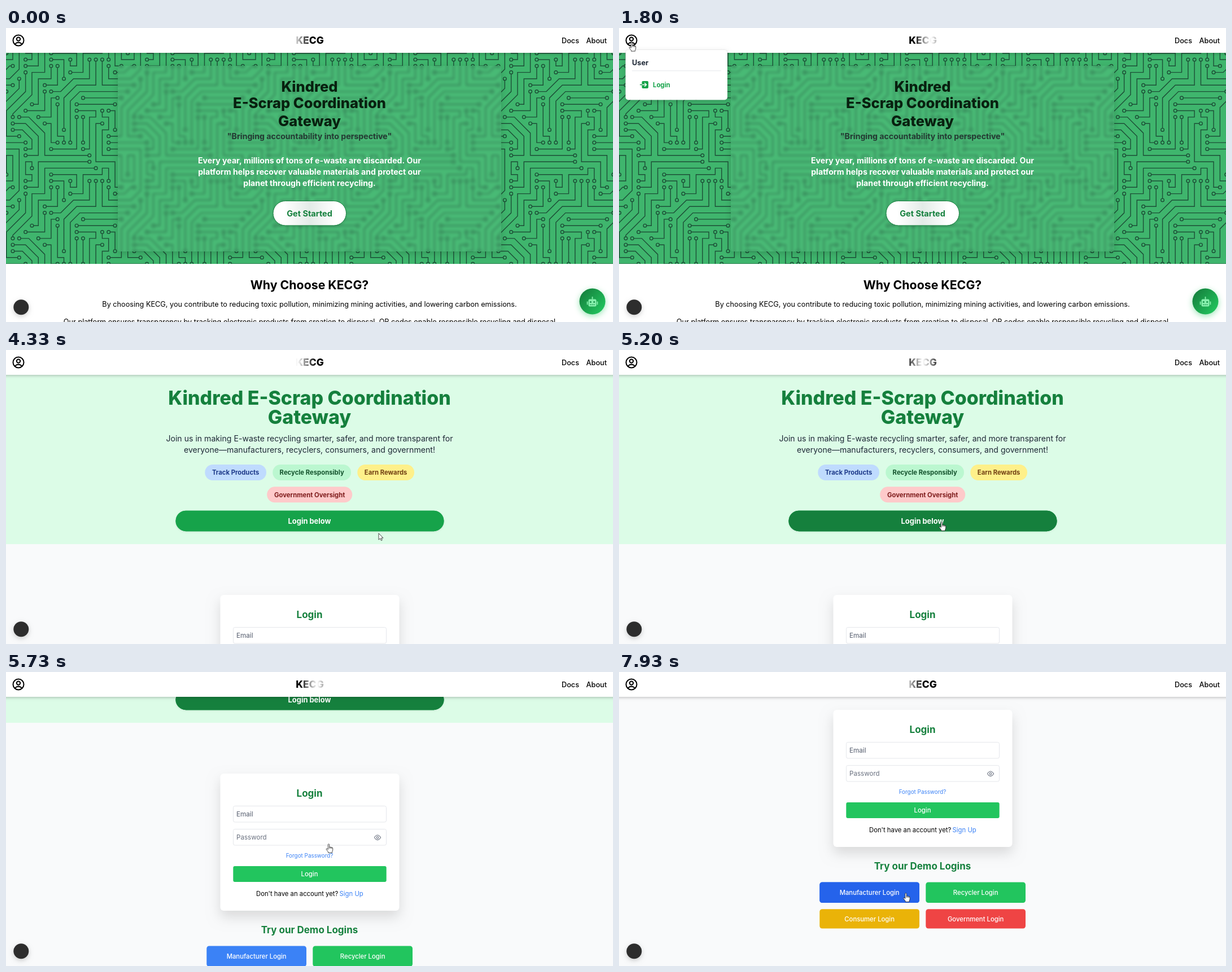
An HTML page with a canvas for the animation above (8000 ms loop, 1075x521 px).

```html
<!DOCTYPE html>
<html lang="en">
<head>
<meta charset="utf-8">
<title>Kindred E-Scrap Coordination Gateway</title>
<style>
html, body { margin: 0; width: 100%; height: 100%; overflow: hidden; background: #fff; }
canvas { display: block; width: 1075px; height: 521px; }
</style>
</head>
<body>
<canvas id="stage"></canvas>
<script>
const W = 1075, H = 521, LOOP = 8000, STEP = 200 / 3;
const POPUP_AT = 1795, LOGIN_AT = 3330, SCROLL_AT = 5265, SCROLL_MS = 762, SCROLL_BY = 367;
const BRAND = 'KECG';
const dpr = window.devicePixelRatio || 1;

function layer(canvas) {
  canvas.width = W * dpr;
  canvas.height = H * dpr;
  const c = canvas.getContext('2d');
  c.scale(dpr, dpr);
  return c;
}
const stage = layer(document.getElementById('stage'));
let g = stage;

// ---- drawing helpers ----
function box(x, y, w, h, r, fill, stroke) {
  g.beginPath();
  g.roundRect(x, y, w, h, r);
  if (fill) { g.fillStyle = fill; g.fill(); }
  if (stroke) { g.strokeStyle = stroke; g.lineWidth = 1; g.stroke(); }
}

function disc(x, y, r, fill) {
  g.beginPath();
  g.arc(x, y, r, 0, 7);
  g.fillStyle = fill;
  g.fill();
}

function shaded(dy, blur, color, draw) {
  g.save();
  g.shadowOffsetY = dy * dpr;
  g.shadowBlur = blur * dpr;
  g.shadowColor = color;
  draw();
  g.restore();
}

// y is the middle of the capitals
function text(str, x, y, size, weight, color, align = 'center') {
  g.font = `${weight} ${size}px Inter, sans-serif`;
  g.textAlign = align;
  g.fillStyle = color;
  g.fillText(str, x, y + size * 0.364);
}

// ---- circuit board background, in units of one grid cell ----
const CELLS = 19, TILE = 215;
const traces = [
  'M3 14H-3', 'M13 17H5V21H3', 'M16 15H21V21.5L19.5 23H16V21', 'M17 8H11', 'M1 5H-4V1',
  'M12 7H18', 'M16 1V-1H15V0H12V3H10', 'M12 14V10', 'M8 8V13H9V14', 'M8 7H7V10H5',
  'M7 15H11V10', 'M6 11H7V14H8', 'M4 18V17H3V19H4V20H3', 'M15 11H14V17H17V21H18',
  'M16 9H17V12', 'M12 15H13V10H14V9H11', 'M6 6V9H3', 'M7 2V4H5V8H4', 'M6 5H8V2', 'M7 1H9V4',
  'M14 18H6V22H4V25.5L1 28.5V29', 'M15 9V10H16V12H15V16H18V20H20V16H19V19',
  'M7 0H11V2H10V1', 'M10 14V7.5L11.5 6H19', 'M1 2H.5L-.5 3H-2'
];
for (let i = 0; i < 3; i++) {
  const [start, down, end] = [[1, 15, 3], [1, 16, 3], [2, 16, 13]][i];
  traces.push(`M${start} ${12 - i}H${2.5 + i / 2}L${4 + i} ${13.5 - i / 2}V${down}H${end}`);
}
for (let i = 0; i < 2; i++) {
  traces.push(`M${3 - i} ${3 + i}V${6 - i / 2}L${-i} ${9 - i / 2}V13H${2 - 5 * i}`);
  traces.push(`M${7 + 2 * i} ${6 + 6 * i}${i ? 'V7' : 'H8.5'}l2 -2H${13 + i}V1`);
}

function traceEnds(d) {
  let x = 0, y = 0, first;
  for (const [, cmd, a, b] of d.matchAll(/([MHVLl])([-\d.]+)(?: ([-\d.]+))?/g)) {
    if (cmd === 'H') x = +a;
    else if (cmd === 'V') y = +a;
    else if (cmd === 'l') { x += +a; y += +b; }
    else { x = +a; y = +b; }
    first = first || [x, y];
  }
  return [first, [x, y]];
}

function circuit() {
  const wires = new Path2D(traces.join(''));
  const ends = traces.flatMap(traceEnds);
  g.fillStyle = '#3fb56d';
  g.fillRect(0, 44, W, 374);
  g.save();
  g.beginPath();
  g.rect(0, 44, W, 374);
  g.clip();
  g.strokeStyle = '#1d4f37';
  for (let row = -2; row < 2; row++) {
    for (let col = -2; col < 6; col++) {
      g.save();
      g.translate(col * TILE + 0.7, 44 + row * TILE + 0.7);
      g.scale(TILE / CELLS, TILE / CELLS);
      g.lineWidth = 0.125;
      g.stroke(wires);
      for (const [x, y] of ends) {
        disc(x, y, 0.25, '#3fb56d');
        g.stroke();
      }
      g.restore();
    }
  }
  g.restore();
}

// ---- home page, drawn once ----
function robotButton() {
  const fill = g.createLinearGradient(1018, 468, 1058, 502);
  fill.addColorStop(0, '#15803d');
  fill.addColorStop(1, '#22c55e');
  shaded(3, 11, 'rgba(34,197,94,.45)', () => disc(1038.5, 484.5, 23, fill));
  const mint = '#86efac';
  box(1031.5, 480.5, 14, 13, 2.5, mint);
  box(1028.7, 484.5, 1.8, 6, 0.8, mint);
  box(1046.5, 484.5, 1.8, 6, 0.8, mint);
  box(1037.6, 476, 1.8, 5, 0.8, mint);
  disc(1035.4, 485.6, 1.5, '#17934a');
  disc(1041.6, 485.6, 1.5, '#17934a');
  for (let i = 0; i < 3; i++) box(1034.3 + i * 3.1, 489.7, 2, 1.3, 0, '#17934a');
}

function homePage() {
  const canvas = document.createElement('canvas');
  g = layer(canvas);
  g.fillStyle = '#fff';
  g.fillRect(0, 0, W, H);
  circuit();

  const sharp = document.createElement('canvas');
  layer(sharp).drawImage(canvas, 0, 0, W, H);
  shaded(4, 12, 'rgba(0,0,0,.16)', () => box(198, 67, 679, 329, 4, '#3fb56d'));
  g.save();
  g.beginPath();
  g.roundRect(198, 67, 679, 329, 4);
  g.clip();
  g.filter = `blur(${2.8 * dpr}px)`;
  g.drawImage(sharp, 0, 0, W, H);
  g.restore();
  box(198, 67, 679, 329, 4, 'rgba(110,205,150,.2)');

  const mid = W / 2, ink = '#08200f';
  text('Kindred', mid, 104, 25.5, 800, ink);
  text('E-Scrap Coordination', mid, 132.5, 25.5, 800, ink);
  text('Gateway', mid, 165, 25.5, 800, ink);
  text('"Bringing accountability into perspective"', mid, 192, 14.15, 700, '#243a33');
  text('Every year, millions of tons of e-waste are discarded. Our', mid, 234.5, 14.15, 700, '#fff');
  text('platform helps recover valuable materials and protect our', mid, 254.5, 14.15, 700, '#fff');
  text('planet through efficient recycling.', mid, 274.5, 14.15, 700, '#fff');

  const sheen = g.createLinearGradient(473, 0, 603, 0);
  sheen.addColorStop(0.15, '#fff');
  sheen.addColorStop(0.5, '#e3ebe7');
  sheen.addColorStop(0.85, '#fff');
  shaded(2, 5, 'rgba(0,0,0,.15)', () => box(473, 306.5, 129.5, 43.5, 21.7, sheen));
  box(473, 306.5, 129.5, 43.5, 21.7, null, '#15803d');
  text('Get Started', mid, 328.5, 14.5, 700, '#15803d');

  text(`Why Choose ${BRAND}?`, mid, 455, 21.3, 700, '#000');
  text(`By choosing ${BRAND}, you contribute to reducing toxic pollution, minimizing mining activities, and lowering carbon emissions.`,
    mid, 489, 12.7, 400, '#000');
  text('Our platform ensures transparency by tracking electronic products from creation to disposal. QR codes enable responsible recycling and disposal',
    mid, 520.5, 12.7, 400, '#000');
  robotButton();
  g = stage;
  return canvas;
}

// ---- pointer ----
const track = [
  [60, 1070, 512], [470, 730, 330], [870, 312, 156], [930, 286, 148], [1400, 60, 50],
  [1670, 22.5, 25], [2130, 22.5, 26], [2600, 62, 94], [3000, 76, 105], [3460, 77, 106],
  [3930, 752, 320], [4130, 740, 335], [4330, 660.5, 325], [4670, 610, 306], [5000, 571.5, 304.5],
  [5900, 571.5, 304.5], [6130, 545, 335], [6400, 470, 386], [6540, 480, 388], [6670, 650.5, 405],
  [6850, 640, 434], [7000, 618, 440], [7200, 470, 446], [7350, 450, 456], [7600, 500, 393],
  [7750, 508, 391.5]
];

function pointer(t) {
  const i = track.findIndex(p => p[0] > t);
  if (i < 0) return track[track.length - 1].slice(1);
  if (i === 0) return track[0].slice(1);
  const [t0, x0, y0] = track[i - 1], [t1, x1, y1] = track[i];
  const k = (t - t0) / (t1 - t0);
  return [x0 + (x1 - x0) * k, y0 + (y1 - y0) * k];
}

function over(t, [x, y, w, h]) {
  const [px, py] = pointer(t);
  return px >= x && px <= x + w && py >= y && py <= y + h;
}

// Share of the last 150 ms spent over the area: a linear hover fade
function hover(t, area) {
  let n = 0;
  for (let i = 0; i < 15; i++) n += over(t - i * 10, area);
  return n / 15;
}

const arrow = new Path2D('M0 0V11.4L2.7 9 4.4 12.8 6.2 12 4.6 8.3H8Z');
const hand = new Path2D('M-1.2 1Q0 -.7 1.2 1V6Q2.5 4.9 3.4 6.1 4.6 5.3 5.4 6.6 7.2 6.1 7.2 8V10.6Q7.1 12.6 6.1 14V15.8H-.9V14.3L-4.2 10Q-4.7 8.2 -2.9 8.5L-1.2 10ZM1.2 6V8.4M3.4 6.2V8.4M5.4 6.7V8.6');

function drawPointer(t, isHand) {
  const [x, y] = pointer(t);
  g.save();
  g.translate(x, y);
  g.lineJoin = 'round';
  g.fillStyle = '#fff';
  g.strokeStyle = '#1a1a1a';
  g.lineWidth = 0.8;
  const shape = isHand ? hand : arrow;
  g.fill(shape);
  g.stroke(shape);
  g.restore();
}

// ---- navigation bar ----
function avatar() {
  g.strokeStyle = '#000';
  g.lineWidth = 2;
  g.beginPath();
  g.arc(22, 22, 9.5, 0, 7);
  g.stroke();
  g.beginPath();
  g.arc(22, 19.6, 3.2, 0, 7);
  g.stroke();
  g.beginPath();
  g.moveTo(15.8, 28.4);
  g.quadraticCurveTo(22, 22.8, 28.2, 28.4);
  g.stroke();
}

// A white glint repeats every 100 px and travels 25 px a second
function brandFill(t) {
  const c = 508 + (t / 40) % 100;
  const fill = g.createLinearGradient(c - 150, 0, c + 150, 0);
  for (const mid of [50, 150, 250]) {
    fill.addColorStop((mid - 32) / 300, '#000');
    fill.addColorStop(mid / 300, '#fff');
    fill.addColorStop((mid + 32) / 300, '#000');
  }
  return fill;
}

function navBar(t) {
  shaded(2, 4.5, 'rgba(0,0,0,.2)', () => {
    g.fillStyle = '#fff';
    g.fillRect(-20, -20, W + 40, 64);
  });
  avatar();
  text(BRAND, 538, 22, 17.4, 800, brandFill(t));
  text('Docs', 984, 22, 12.7, 500, '#000', 'left');
  text('About', 1064, 22, 12.7, 500, '#000', 'right');
}

const loginRow = [23, 84.5, 158, 31.5];

function userMenu(t) {
  shaded(3, 9, 'rgba(0,0,0,.16)', () => box(11.5, 38.5, 180.5, 89, 5, '#fff'));
  box(11.5, 38.5, 180.5, 89, 5, null, 'rgba(0,0,0,.06)');
  text('User', 23, 61, 12.7, 700, '#1f2937', 'left');
  g.fillStyle = '#e5e7eb';
  g.fillRect(23, 75.3, 158, 1);
  g.globalAlpha = hover(t, loginRow);
  box(...loginRow, 4, '#f3f4f6');
  g.globalAlpha = 1;

  box(40.5, 94, 11.5, 13, 2, '#16a34a');
  g.lineWidth = 1.5;
  for (const [color, from, to] of [['#16a34a', 37, 41], ['#fff', 41, 48]]) {
    g.strokeStyle = color;
    g.beginPath();
    g.moveTo(from, 100.5);
    g.lineTo(to, 100.5);
    g.stroke();
  }
  g.beginPath();
  g.moveTo(45.2, 97.2);
  g.lineTo(48.5, 100.5);
  g.lineTo(45.2, 103.8);
  g.stroke();
  text('Login', 60, 100.5, 11.3, 700, '#16a34a', 'left');
}

// ---- login page ----
const below = [300.5, 284.7, 475, 36.5];
const demos = [
  ['Manufacturer Login', [355.3, 372.5, 176.7, 36.5], '#3b82f6', '#2563eb'],
  ['Recycler Login', [543.3, 372.5, 176.7, 36.5], '#22c55e', '#16a34a'],
  ['Consumer Login', [355.3, 420.3, 176.7, 34.2], '#eab308', '#ca8a04'],
  ['Government Login', [543.3, 420.3, 176.7, 34.2], '#ef4444', '#dc2626']
];
const pills = [
  ['Track Products', 352.3, 203, 108.7, '#bfdbfe', '#1e3a8a'],
  ['Recycle Responsibly', 472.3, 203, 138.7, '#bbf7d0', '#14532d'],
  ['Earn Rewards', 622.3, 203, 100.7, '#fef08a', '#713f12'],
  ['Government Oversight', 462.2, 242.3, 151, '#fecaca', '#7f1d1d']
];

function button(area, r, color, dark, amount) {
  box(...area, r, color);
  g.globalAlpha = amount;
  box(...area, r, dark);
  g.globalAlpha = 1;
}

function banner(t) {
  const mid = W / 2;
  g.fillStyle = '#dcfce7';
  g.fillRect(0, 44, W, 300);
  text('Kindred E-Scrap Coordination', mid, 84.5, 33.9, 800, '#15803d');
  text('Gateway', mid, 119, 33.9, 800, '#15803d');
  text('Join us in making E-waste recycling smarter, safer, and more transparent for', mid, 156.5, 14.1, 400, '#1f2937');
  text('everyone—manufacturers, recyclers, consumers, and government!', mid, 176.5, 14.1, 400, '#1f2937');
  for (const [label, x, y, w, fill, ink] of pills) {
    box(x, y, w, 28, 14, fill);
    text(label, x + w / 2, y + 14.2, 11.3, 700, ink);
  }
  shaded(1, 3, 'rgba(0,0,0,.1)', () => box(...below, 18.2, '#16a34a'));
  button(below, 18.2, '#16a34a', '#15803d', t < 6200 ? hover(t, below) : 0);
  text('Login below', mid, 303, 12.9, 700, '#fff');
}

function eye(x, y) {
  g.strokeStyle = '#6b7280';
  g.lineWidth = 1.1;
  g.beginPath();
  g.moveTo(x - 5.6, y);
  g.quadraticCurveTo(x, y - 8.6, x + 5.6, y);
  g.quadraticCurveTo(x, y + 8.6, x - 5.6, y);
  g.stroke();
  g.beginPath();
  g.arc(x, y, 1.8, 0, 7);
  g.stroke();
}

function loginForm(t) {
  const mid = W / 2;
  shaded(11, 22, 'rgba(0,0,0,.13)', () => box(379.5, 67, 317, 243, 6, '#fff'));
  text('Login', mid, 101.5, 17, 700, '#15803d');
  box(402.5, 124.5, 271, 28.5, 3, '#fff', '#e5e7eb');
  text('Email', 408, 139, 11.6, 500, '#6b7280', 'left');
  box(402.5, 165.5, 271, 28.5, 3, '#fff', '#e5e7eb');
  text('Password', 408, 180, 11.6, 400, '#6b7280', 'left');
  eye(658, 180.3);
  text('Forgot Password?', mid, 212.7, 9.9, 400, '#3b82f6');
  box(402.3, 231, 271.4, 28, 3, '#22c55e');
  text('Login', mid, 245.3, 11.3, 500, '#fff');
  text("Don't have an account yet?", 443, 279.5, 11.3, 400, '#000', 'left');
  text('Sign Up', 632.7, 279.5, 11.3, 400, '#3b82f6', 'right');
  text('Try our Demo Logins', mid, 344, 17, 700, '#15803d');
  for (const [label, area, color, dark] of demos) {
    button(area, 4.5, color, dark, t > 6050 ? hover(t, area) : 0);
    text(label, area[0] + area[2] / 2, area[1] + area[3] / 2 + 0.3, 11.3, 500, '#fff');
  }
}

// cubic-bezier(.42, 0, .58, 1)
function easeInOut(k) {
  if (k <= 0) return 0;
  if (k >= 1) return 1;
  let lo = 0, hi = 1;
  for (let i = 0; i < 20; i++) {
    const s = (lo + hi) / 2, r = 1 - s;
    const x = 3 * r * r * s * 0.42 + 3 * r * s * s * 0.58 + s * s * s;
    if (x < k) lo = s; else hi = s;
  }
  return lo * lo * (3 - 2 * lo);
}

function loginPage(t) {
  const y = Math.round(SCROLL_BY * easeInOut((t - SCROLL_AT) / SCROLL_MS));
  g.fillStyle = '#f9fafb';
  g.fillRect(0, 0, W, H);
  g.save();
  g.translate(0, -y);
  banner(t);
  g.translate(0, SCROLL_BY);
  loginForm(t);
  g.restore();
}

function isHand(t) {
  if (t < LOGIN_AT) return over(t, [11, 11, 22, 22]);
  if (t < 6050) return over(t, below);
  return demos.some(d => over(t, d[1]));
}

// ---- playback ----
const home = homePage();

function draw(t) {
  const onHome = t < LOGIN_AT;
  if (onHome) g.drawImage(home, 0, 0, W, H);
  else loginPage(t);
  navBar(t);
  if (onHome && t >= POPUP_AT) userMenu(t);
  shaded(3, 9, 'rgba(0,0,0,.18)', () => disc(26.8, 494.7, 13.5, '#2d2d2d'));
  if (t > 60) drawPointer(t, isHand(t));
}

function tick() {
  const now = performance.now() % LOOP;
  draw(Math.floor(now / STEP + 0.1) * STEP % LOOP);
  requestAnimationFrame(tick);
}
tick();
</script>
</body>
</html>
```
